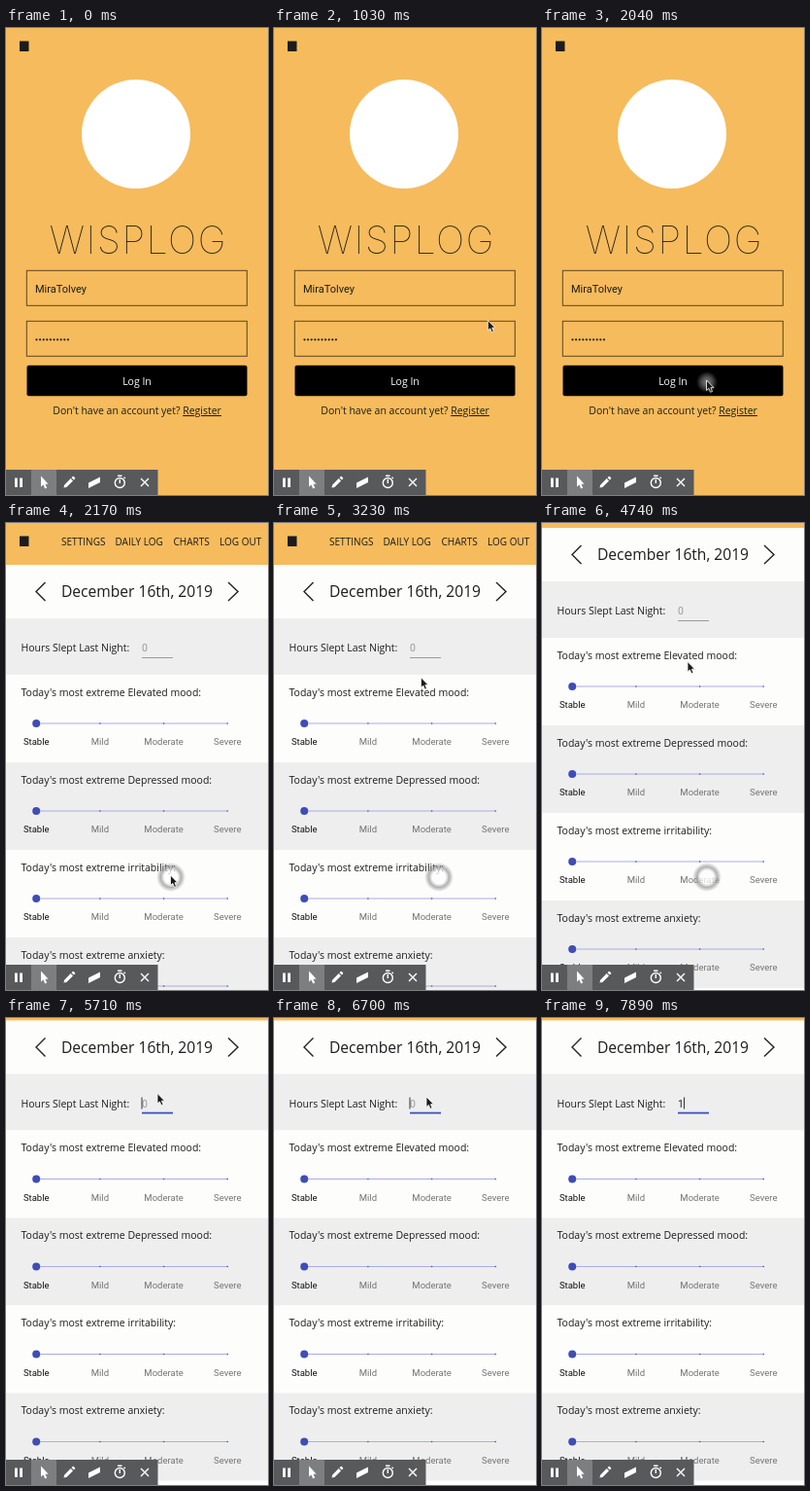
These frames come from a looping animation (270 by 480 pixels, 8 s). An HTML page:

```html
<!DOCTYPE html>
<html lang="en">
<head>
<meta charset="utf-8">
<title>Mood tracker</title>
<style>
  html, body { margin: 0; width: 100%; height: 100%; overflow: hidden; background: #fdfdfc; }
  svg { display: block; width: 100%; height: 100%; }
  text { font-family: "Open Sans", "Noto Sans", sans-serif; font-size: 10.5px; fill: #1c1c1c; white-space: pre; }
  .mid { text-anchor: middle; }
  .roboto, .tick { font-family: Roboto, Arial, sans-serif; }
  .tick { font-size: 9.5px; text-anchor: middle; fill: #747474; }
  .on { fill: #111; }
  .nav { font-size: 10px; }
  .line { fill: none; stroke: #222; }
  .field { fill: none; stroke: #5c4622; }
</style>
</head>
<body>
<svg viewBox="0 0 270 480">
  <defs>
    <radialGradient id="glow">
      <stop offset="0" stop-color="#fff" stop-opacity=".5"/>
      <stop offset=".5" stop-color="#fff" stop-opacity=".3"/>
      <stop offset="1" stop-color="#fff" stop-opacity="0"/>
    </radialGradient>
    <radialGradient id="ring">
      <stop offset="0" stop-color="#fff" stop-opacity=".85"/>
      <stop offset=".45" stop-color="#fff" stop-opacity=".7"/>
      <stop offset=".7" stop-color="#999" stop-opacity=".75"/>
      <stop offset="1" stop-color="#999" stop-opacity="0"/>
    </radialGradient>
  </defs>

  <g id="login">
    <rect width="270" height="480" fill="#f6bb5c"/>
    <rect x="14" y="13.5" width="9.5" height="10.5" fill="#1c1c1c"/>
    <circle cx="134" cy="109" r="56" fill="#fff"/>
    <text class="mid" x="136.5" y="232" style="font:100 39px Inter,Lato,sans-serif;letter-spacing:1.6px">WISPLOG</text>
    <rect class="field" x="21.3" y="249.3" width="227" height="36"/>
    <rect class="field" x="21.3" y="301.3" width="227" height="36"/>
    <text class="roboto" x="30" y="272" style="font-size:11px">MiraTolvey</text>
    <path d="M31.5 320.3H65" stroke="#222" stroke-width="2.3" stroke-linecap="round" stroke-dasharray="0 3.6"/>
    <rect x="21.5" y="346.7" width="227" height="31.5" rx="2"/>
    <text class="mid" x="135" y="366.5" style="fill:#fff">Log In</text>
    <text x="48.3" y="397">Don't have an account yet? <tspan text-decoration="underline">Register</tspan></text>
  </g>

  <g id="diary">
    <rect width="270" height="480" fill="#fdfdfc"/>
    <g id="page">
      <rect y="-2" width="270" height="45" fill="#f6bb5c"/>
      <rect x="14" y="13.5" width="9.5" height="10.5" fill="#1c1c1c"/>
      <g id="nav"></g>
      <path class="line" d="M40.5 61 31 70.5 40.5 80M229 61l10 9.5-10 9.5" stroke-width="1.4"/>
      <text x="57" y="76.3" style="font-size:15.6px">December 16th, 2019</text>
      <rect y="98" width="270" height="58" fill="#eee"/>
      <text x="15.5" y="132">Hours Slept Last Night:</text>
      <text id="hours" class="roboto" x="140" y="132"></text>
      <rect id="underline" x="140" width="32"/>
      <rect id="caret" y="122" width="1" height="12" fill="#333"/>
      <g id="rows"></g>
    </g>
  </g>

  <circle id="halo" cx="170" cy="364"/>

  <g id="toolbar">
    <rect y="454" width="156.5" height="26" fill="#58595b"/>
    <rect x="26" y="454" width="26" height="26" fill="#7d7e80"/>
    <g fill="#fff">
      <path d="M9 462.5h2.8v9.5H9zM14.2 462.5H17v9.5h-2.8z"/>
      <path d="M36 460.5v11l2.4-2 1.8 4 2-.9-1.8-3.8h3.2z"/>
      <path d="M59.5 472.5l.6-2.8 6.6-6.6 2.3 2.3-6.6 6.6zM67.5 462.3l1.2-1.2q.6-.5 1.2 0l1.1 1.1q.5.6 0 1.2l-1.2 1.2z"/>
      <path d="M85 467.5l12-6v5.5l-12 6z"/>
      <path d="M115 459.5h4.5v1.5H115zM121 462.2l1-1 1.3 1.3-1 1z"/>
    </g>
    <g fill="none" stroke="#fff" stroke-width="1.4">
      <circle cx="117.3" cy="467.5" r="5"/>
      <path d="M117.3 464v4M139 463l8 8M147 463l-8 8"/>
    </g>
  </g>

  <path id="cursor" d="M0 0V10.5L2.4 8.4 4 12.3 6 11.5 4.4 7.7H7.5Z" fill="#1a1a1a" stroke="#fff" stroke-width=".8"/>
</svg>

<script>
const LOOP = 8000;
const $ = id => document.getElementById(id);
const set = (id, attrs) => {
  for (const k in attrs) $(id).setAttribute(k, attrs[k]);
};
const show = (id, on) => set(id, { visibility: on ? 'visible' : 'hidden' });

const navItems = { 'SETTINGS': 57, 'DAILY LOG': 112.5, 'CHARTS': 172.5, 'LOG OUT': 220 };
$('nav').innerHTML = Object.entries(navItems)
  .map(([label, x]) => `<text class="nav" x="${x}" y="22.9">${label}</text>`).join('');

const moods = ['Elevated mood', 'Depressed mood', 'irritability', 'anxiety'];
const levels = ['Stable', 'Mild', 'Moderate', 'Severe'];
const levelX = i => 31.2 + i * 65.7;

function moodRow(mood, i) {
  const ticks = levels.map((name, k) =>
    `<circle cx="${levelX(k)}" cy="50" r="${k ? 0.8 : 4}" fill="#3f4db5"/>
     <text class="tick ${k ? '' : 'on'}" x="${levelX(k)}" y="72.3">${name}</text>`).join('');
  return `<g transform="translate(0 ${156 + i * 90})">
    <rect width="270" height="90" fill="${i % 2 ? '#eee' : '#fdfdfc'}"/>
    <text x="15.5" y="21.9">Today's most extreme ${mood}:</text>
    <path d="M31 50H228" stroke="#a9aee2" stroke-width="1.1"/>${ticks}</g>`;
}
$('rows').innerHTML = moods.map(moodRow).join('');

// Pointer moves: start, end, number of steps, destination
const moves = [
  [750, 1340, 5, 169.5, 362],
  [2480, 3370, 6, 150, 142.5],
  [5140, 5570, 4, 156, 77.5],
  [5840, 5840, 1, 157, 81]
];
const ease = p => p * p * (3 - 2 * p);

function pointerAt(t) {
  let x = 248, y = 267;
  for (const [start, end, n, tx, ty] of moves) {
    if (t < start) break;
    const gap = (end - start) / Math.max(1, n - 1);
    const step = t >= end ? n : Math.floor((t - start) / gap) + 1;
    const p = ease(step / n);
    x += (tx - x) * p;
    y += (ty - y) * p;
  }
  return [x, y];
}

const scrolls = [[3790, 0.4], [3930, 0.8], [4740, 38], [4870, 39.5], [5000, 40.5]];
const scrollAt = t => scrolls.reduce((y, [at, to]) => t >= at ? to : y, 0);

function draw(t) {
  const loggedIn = t >= 2170, focused = t >= 5710, typed = t >= 7890;
  show('login', !loggedIn);
  show('diary', loggedIn);
  set('page', { transform: `translate(0 ${-scrollAt(t)})` });

  show('halo', t >= 1340 && t < 5000);
  set('halo', { r: loggedIn ? 15 : 11, fill: loggedIn ? 'url(#ring)' : 'url(#glow)' });

  $('hours').textContent = typed ? '1' : '0';
  $('hours').style.fill = typed ? '#222' : '#999';
  set('underline', focused
    ? { y: 137.2, height: 1.8, fill: '#3f51b5' }
    : { y: 138, height: 0.8, fill: '#888' });
  const blink = Math.floor((t - 5705) / 495) % 2 === 0;
  show('caret', focused && (typed || blink));
  set('caret', { x: typed ? 146 : 139.5 });

  const [x, y] = pointerAt(t);
  show('cursor', t >= 100 && !typed);
  set('cursor', { transform: `translate(${x} ${y})` });
}

const begin = performance.now();
function tick() {
  draw((performance.now() - begin) % LOOP);
  requestAnimationFrame(tick);
}
tick();
</script>
</body>
</html>
```
